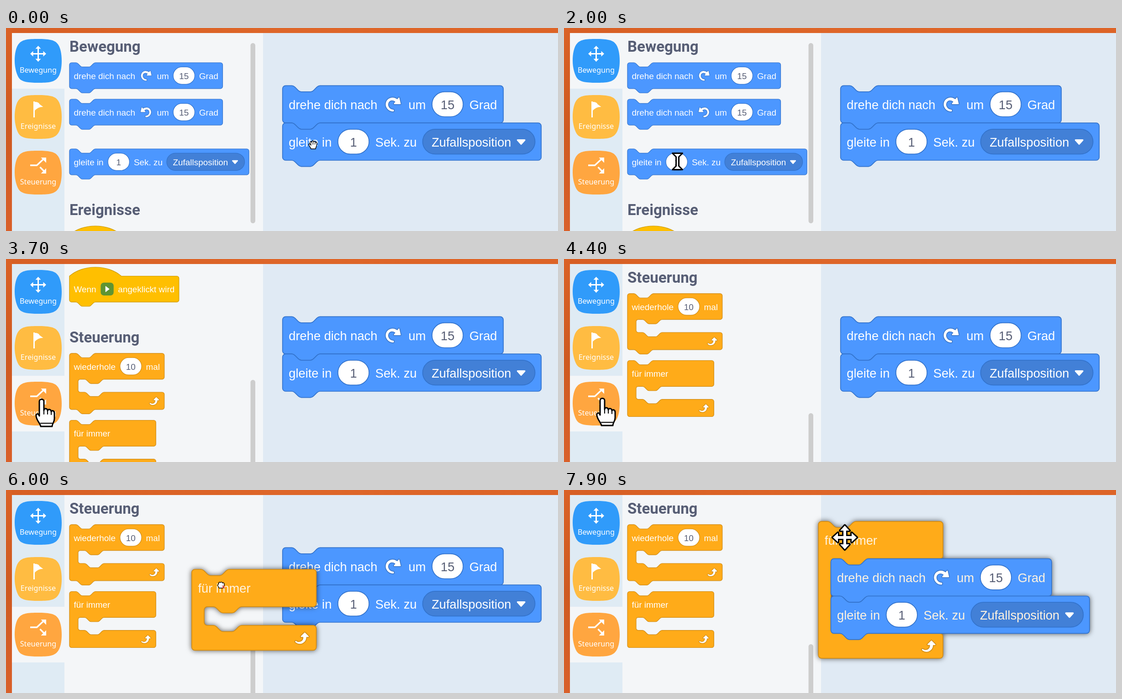
Write an HTML page that moves like this. It is 1209 px wide and 445 px high and loops after 8000 ms.

```html
<!DOCTYPE html>
<html lang="de">
<head>
<meta charset="utf-8">
<title>Blöcke</title>
<style>
  html, body { margin: 0; width: 100%; height: 100%; overflow: hidden; background: #e0eaf4; }
  svg { display: block; }
  text { font: 16px "Liberation Sans", Arial, sans-serif; fill: #fff; }
  .num { fill: #575e75; text-anchor: middle; }
  .head { font: 700 33px Roboto, sans-serif; fill: #575e75; }
  .label { font: 16.2px "Noto Sans", sans-serif; text-anchor: middle; }
  .drag { filter: drop-shadow(0 0 6px rgba(0, 0, 0, .62)); }
  .drag .word { fill: #fff3e0; }
  .cur { fill: #fff; stroke: #000; stroke-linejoin: round; stroke-linecap: round; }
</style>
</head>
<body>
<svg id="stage" width="1209" height="445" viewBox="0 0 1209 445"></svg>
<script>
const BIG = 1.705, SMALL = 1.183;
const BLUE = ['#4c97ff', '#3373cc'], GOLD = ['#ffbf00', '#cc9900'], ORANGE = ['#ffab19', '#cf8b17'];

// Outline pieces in block units
const notch = 'c2 0 3 1 4 2l4 4c1 1 2 2 4 2h12c2 0 3-1 4-2l4-4c1-1 2-2 4-2';
const notchBack = 'c-2 0-3 1-4 2l-4 4c-1 1-2 2-4 2h-12c-2 0-3-1-4-2l-4-4c-1-1-2-2-4-2';
const top_ = w => `M0 4A4 4 0 0 1 4 0H12${notch}H${w - 4}a4 4 0 0 1 4 4`;
const bottom = bump => `a4 4 0 0 1-4 4${bump ? 'H48' + notchBack : ''}H4a4 4 0 0 1-4-4z`;
const stackPath = w => top_(w) + 'v40' + bottom(true);
const hatPath = w => `M0 0c25-22 71-22 96 0H${w - 4}a4 4 0 0 1 4 4v40` + bottom(true);
const loopPath = (w, mouth, bump) => top_(w) + `v40a4 4 0 0 1-4 4H64${notchBack}h-8a4 4 0 0 0-4 4` +
  `v${mouth - 8}a4 4 0 0 0 4 4h8${notch}H${w - 4}a4 4 0 0 1 4 4v24` + bottom(bump);

const at = (x, y, s, body, extra = '') => `<g transform="translate(${x} ${y}) scale(${s})" ${extra}>${body}</g>`;
const shape = (d, [fill, line]) => `<path d="${d}" fill="${fill}" stroke="${line}"/>`;
const word = (x, s) => `<text class="word" x="${x}" y="30.2">${s}</text>`;
const field = (x, s, line) => `<rect x="${x}" y="8" width="40" height="32" rx="16" fill="#fff" stroke="${line}"/>` +
  `<text class="num" x="${x + 20}" y="30.2">${s}</text>`;

const turnArrow = 'M21.38 11.83H13.77a.59.59 0 0 1-.43-1l1.75-2.19a5.9 5.9 0 0 0-4.7-1.58 5.07 5.07 0 0 0-4.11 3.17' +
  'A6 6 0 0 0 7 15.77a6.51 6.51 0 0 0 5 2.92 1.31 1.31 0 0 1-.08 2.62 9.3 9.3 0 0 1-7.35-3.82A9.16 9.16 0 0 1 3.17 9.12' +
  ' 8.51 8.51 0 0 1 5.71 5.4 8.76 8.76 0 0 1 9.82 3.48a9.71 9.71 0 0 1 7.75 2.07l1.67-2.1a.59.59 0 0 1 1 .21L22 11.08A.59.59 0 0 1 21.38 11.83z';
const loopArrow = 'M21.8 11h-2.6c0 1.5-.3 2.9-1 4.2c-.8 1.6-2.1 2.8-3.7 3.6c-1.5.8-3.3 1.1-4.9.8c-1.6-.2-3.2-1-4.4-2.1' +
  'c-.4-.3-.4-.9-.1-1.2c.3-.4.9-.4 1.2-.1c1 .7 2.2 1.1 3.4 1.1s2.3-.3 3.3-1c.9-.6 1.6-1.5 2-2.6c.3-.9.4-1.8.2-2.8h-2.4' +
  'c-.4 0-.7-.3-.7-.7c0-.2.1-.3.2-.4l4.4-4.4c.3-.3.7-.3.9 0L22 9.8c.3.3.4.6.3.9S22 11 21.8 11z';
const icon = (d, line) => `<path d="${d}" fill="#fff" stroke="${line}" stroke-width="2" paint-order="stroke"/>`;

const turn = right => shape(stackPath(283.6), BLUE) + word(8, 'drehe dich nach') +
  `<g transform="translate(${right ? 129.8 : 153.8} 12) scale(${right ? 1 : -1} 1)">${icon(turnArrow, '#3d79cc')}</g>` +
  word(161.8, 'um') + field(192, '15', BLUE[1]) + word(240, 'Grad');

const glide = shape(stackPath(332.3), BLUE) + word(8, 'gleite in') + field(71.1, '1', BLUE[1]) +
  word(119.1, 'Sek. zu') +
  `<rect x="180" y="8" width="144.3" height="32" rx="16" fill="#4280d7" stroke="${BLUE[1]}"/>` +
  word(191.5, 'Zufallsposition') +
  '<path d="M302 22h9l-4.5 5z" fill="#fff" stroke="#fff" stroke-width="2" stroke-linejoin="round"/>';

const whenClicked = shape(hatPath(202.7), GOLD) + word(8, 'Wenn') +
  '<rect x="57.8" y="12" width="24" height="24" rx="6" fill="#5f9432"/><path d="M67 19l6.5 5-6.5 5z" fill="#fff" stroke="#fff" stroke-linejoin="round"/>' +
  word(89.8, 'angeklickt wird');

const loopMark = (w, y) => at(w - 32, y, 1, icon(loopArrow, ORANGE[1]));
const repeat = shape(loopPath(175.6, 24, true), ORANGE) + word(8, 'wiederhole') + field(93.6, '10', ORANGE[1]) +
  word(141.6, 'mal') + loopMark(175.6, 76);
const forever = mouth => shape(loopPath(160, mouth, false), ORANGE) + word(8, 'für immer') + loopMark(160, mouth + 52);
const stack = at(0, 0, 1, turn(true)) + at(0, 48, 1, glide);

const head = (y, s) => `<text class="head" x="139" y="${y}">${s}</text>`;
const palette = head(52, 'Bewegung') + at(139, 76, SMALL, turn(true)) + at(139, 156, SMALL, turn(false)) +
  at(139, 265, SMALL, glide) + head(409.5, 'Ereignisse') + at(139, 453.5, SMALL, whenClicked) +
  head(599, 'Steuerung') + at(139, 622.8, SMALL, repeat) + at(139, 769.5, SMALL, forever(24));

// Category menu
const blob = 'M0-48C22-48 35-46 41-39C49-31 51.5-15 51.5 0S49 31 41 39S22 48 0 48S-35 46-41 39S-51.5 15-51.5 0S-49-31-41-39S-22-48 0-48z';
const arm = '<path d="M-1.5 0V-11H-6L0-17.5L6-11H1.5V0z"/>';
const cross = [0, 90, 180, 270].map(a => `<g transform="rotate(${a})">${arm}</g>`).join('');
const flag = '<path d="M-10.5-34h3V1h-3zM-7.5-33Q1-33 3-28L11-22Q1-23-7.5-14z"/>';
const branch = '<path d="M-17.5-16H-3L12-30M4-12L13-3" fill="none" stroke="#fff" stroke-width="3.4"/>' +
  '<path d="M6-33h11.500v11.500zM17.500 2H6L17.500-9.500z"/>';
const category = (y, color, name, mark, dy) => at(70.5, y, 1,
  `<path d="${blob}" fill="${color}"/><g fill="#fff" transform="translate(0 ${dy})">${mark}</g><text class="label" y="26">${name}</text>`);

// Pointers
const quad = [0, 90, 180, 270].map(a => `<path transform="rotate(${a})" d="M-3-3V-15H-10L0-26L10-15H3V-3"/>`).join('');
const fist = '<path stroke-width="1.4" d="M-5 4C-8 1-7-3-5-3C-6-7-2-8-1-6C0-8 3-8 3-5C6-7 8-4 7-1C7 2 5 3 5 6H-4z"/>';
const pointers = {
  grab: '<path stroke-width="1.5" d="M-4 9C-5 5-9 2-9-1C-8-3-6-2-4 1L-6-4C-6-8-3-8-2-5V-7C-1-10 2-9 2-6C3-9 5-8 6-5C7-7 9-6 9-3C9 2 7 4 6 9z"/>' +
    '<path stroke-width="1" d="M-2-5L-1-1M2-6V-1M6-5L5-1"/>',
  hold: fist,
  drop: fist + '<path d="M3 1l5 5M8 1l-5 5" stroke="#d8322a" stroke-width="1.4"/>',
  arrow: '<path stroke-width="3" d="M1.500 1.500V50L12 40L20 58L28 55L20 37H36z"/>',
  hand: '<path stroke-width="3" d="M-5 4C-5-2 5-2 5 4V24C5 18 13 19 13 25C14 20 21 21 21 27C22 23 28 24 28 30V42C28 50 23 52 23 59H-2C-3 52-10 48-12 37C-13 30-7 30-5 36z"/>' +
    '<path stroke-width="2" d="M5 24V32M13 25V32M21 27V33M-2 52H23"/>',
  beam: '<path stroke-width="3" d="M-11-18H11L3-10V10L11 18H-11L-3 10V-10z"/>',
  move: `<g stroke-width="6">${quad}</g><g stroke="none">${quad}<path d="M-3-3H3V3H-3z"/></g>`
};

document.getElementById('stage').innerHTML = `
  <defs>
    <linearGradient id="rim"><stop stop-color="#d75f24"/><stop offset=".5" stop-color="#de6629"/><stop offset="1" stop-color="#dd6427"/></linearGradient>
    <linearGradient id="side" x2="0" y2="1"><stop stop-color="#da6125"/><stop offset=".5" stop-color="#cf5a20"/><stop offset="1" stop-color="#d9602a"/></linearGradient>
    <clipPath id="flyout"><path d="M128 11H563V445H128z"/></clipPath>
  </defs>
  <path d="M0 0H1209V445H0z" fill="#e0eaf4"/>
  <path d="M13 11H128V445H13z" fill="#dfebf4"/>
  <path d="M128 11H563V445H128z" fill="#f4f6f8"/>
  <path id="chosen" d="M13 11H128V133H13z" fill="#f4f6f8"/>
  <path d="M0 0H1209V11H0z" fill="url(#rim)"/>
  <path d="M0 0H13V445H0z" fill="url(#side)"/>
  ${category(72, '#309bfa', 'Bewegung', cross, -15.500)}
  ${category(195, '#ffbc42', 'Ereignisse', flag, 0)}
  ${category(317, '#ffa640', 'Steuerung', branch, 0)}
  <g clip-path="url(#flyout)">
    <g id="palette">${palette}</g>
    <rect id="bar" x="535.500" y="33" width="10.500" height="395" rx="5.200" fill="#cdcdcd"/>
  </g>
  <g id="ghost">${at(578.5, 44.5, BIG, `<path d="${loopPath(160, 96, false)}" opacity=".2"/>`)}</g>
  <g id="loose">${at(605.7, 126.3, BIG, stack)}</g>
  <g id="carried"><g class="drag">${at(0, 0, BIG, forever(24))}</g></g>
  <g id="joined"><g id="lift">${at(557.2, 68.8, BIG, forever(96) + at(16, 48, 1, stack))}</g></g>
  ${Object.keys(pointers).map(k => `<g class="cur" id="${k}">${pointers[k]}</g>`).join('')}`;

// Each row: start time, then the state held until the next row
const pointerSteps = [
  [0, 'grab', 672, 256], [600, 'grab', 668, 256], [700, 'grab', 652, 257], [800, 'grab', 622, 258],
  [900, 'arrow', 588, 259], [1000, 'arrow', 552, 262], [1100, 'grab', 512, 270], [1200, 'grab', 468, 277],
  [1300, 'grab', 430, 282], [1400, 'grab', 408, 284], [1500, 'grab', 394, 286], [1600, 'grab', 368, 289],
  [1700, 'grab', 336, 291], [1800, 'grab', 302, 292], [1900, 'beam', 267, 292], [2000, 'beam', 248.5, 292.5],
  [2100, 'grab', 206, 299], [2200, 'grab', 162, 308], [2300, 'grab', 165, 311], [2400, 'arrow', 133, 306],
  [3000, 'hand', 78, 308], [4400, 'hand', 84, 306], [4500, 'hand', 108, 297], [4600, 'arrow', 137, 284],
  [4700, 'grab', 165, 274], [4800, 'grab', 164, 275], [5100, 'grab', 168, 272], [5200, 'grab', 175, 267],
  [5300, 'grab', 171, 264], [5500, 'move', 171, 258], [6500, 'move', 602, 105], [7000, 'grab', 615, 104],
  [7800, 'move', 615, 104]
];
const carrySteps = [
  [5600, 165, 231], [5700, 216, 224], [5800, 280, 208], [5900, 345, 191], [6000, 406.800, 174],
  [6100, 462, 150], [6200, 508, 117], [6300, 544, 86], [6500, 548.3, 70.3]
];
const scrollSteps = [[0, 0], [3700, 416], [3800, 532], [3900, 545], [4000, 547]];

const el = id => document.getElementById(id);
const current = (steps, t) => steps.filter(s => s[0] <= t).pop();
const move = (id, x, y) => el(id).setAttribute('transform', `translate(${x} ${y})`);
const show = (id, on) => el(id).setAttribute('display', on ? 'inline' : 'none');

function draw(now) {
  const t = now % 8000;
  const scroll = current(scrollSteps, t)[1];
  move('palette', 0, -scroll);
  move('bar', 0, scroll * .5576);
  move('chosen', 0, t < 3700 ? 0 : 245);

  const carrying = t >= 5600 && t < 7000;
  let [, kind, x, y] = current(pointerSteps, t);
  if (carrying) {
    const [, bx, by] = current(carrySteps, t);
    move('carried', bx, by);
    if (t < 6500) {
      [x, y] = [bx + 64, by + 35];
      kind = x < 563 ? 'drop' : 'hold';
    }
  }
  show('carried', carrying);
  show('ghost', t >= 6300 && t < 7000);
  show('loose', t < 7000);
  show('joined', t >= 7000);
  el('lift').setAttribute('class', t >= 7900 ? 'drag' : '');

  for (const k in pointers) show(k, k === kind);
  move(kind, x, y);
  requestAnimationFrame(draw);
}
draw(0);
</script>
</body>
</html>
```
